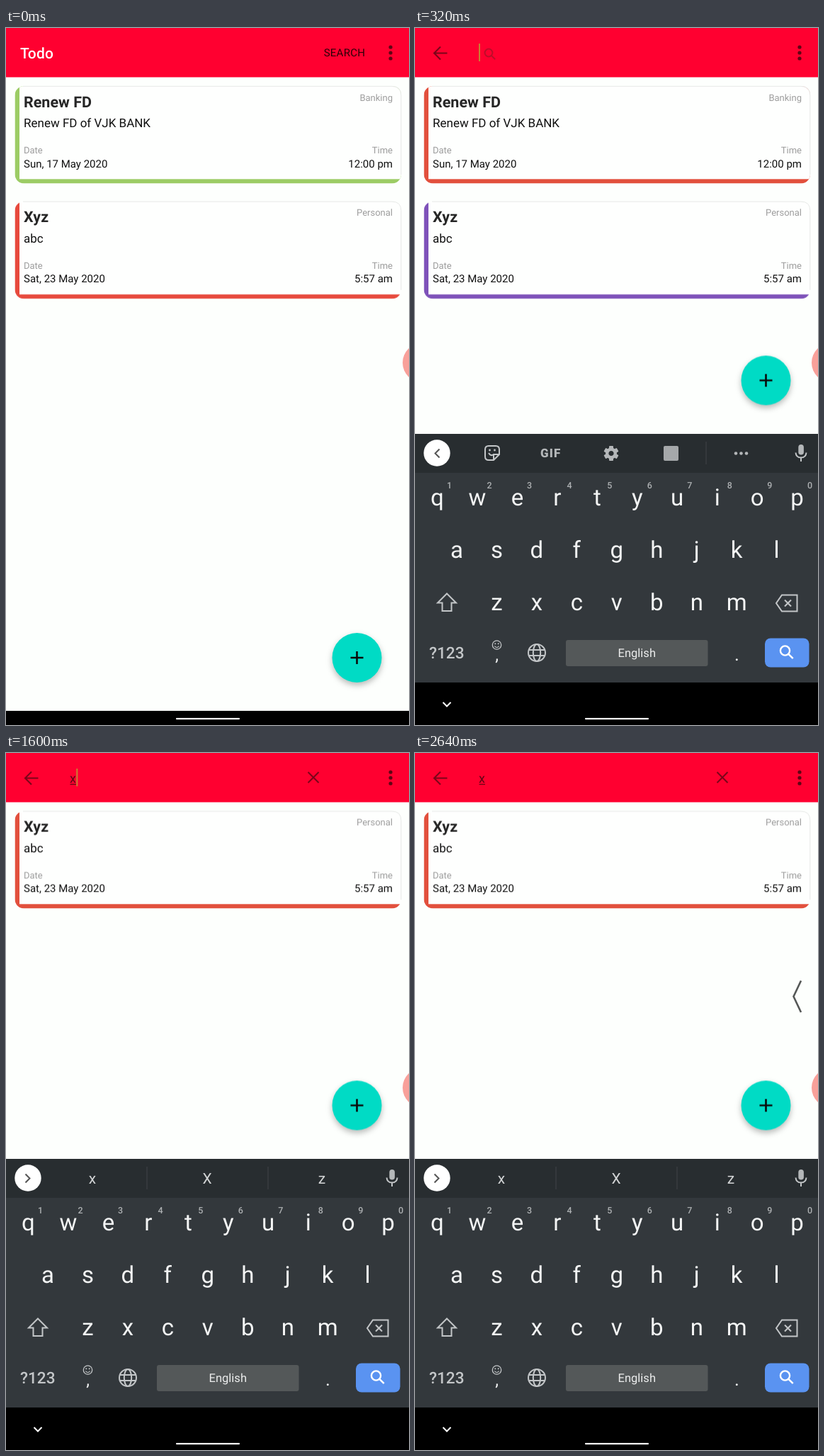
Write an HTML page that moves like this. It is 569 by 984 pixels and loops after 2680 ms.

```html
<!DOCTYPE html>
<html lang="en">
<head>
<meta charset="utf-8">
<title>Todo search</title>
<style>
  html, body { margin: 0; width: 100%; height: 100%; overflow: hidden; background: #fdfffd; }
  svg { display: block; width: 569px; height: 984px; }
  text { font-family: Roboto, sans-serif; text-rendering: geometricPrecision; white-space: pre; }
  .line { fill: none; stroke: #c3c6c8; stroke-width: 2; }
  .bar { fill: none; stroke: #7a0519; stroke-width: 2.1; }
  .small { font-size: 13px; fill: #9d9d9d; }
  .value { font-size: 15px; fill: #111; }
  .key { font-size: 33px; fill: #f4f5f5; text-anchor: middle; }
  .hint { font-size: 12.5px; font-weight: 500; fill: #aeb1b3; text-anchor: middle; }
  .word { font-size: 21px; fill: #d3d5d6; text-anchor: middle; }
  .end { text-anchor: end; }
  #fab { filter: drop-shadow(0 4px 4px rgba(0, 0, 0, .27)); }
</style>
</head>
<body>
<svg id="stage" viewBox="0 0 569 984"></svg>
<script>
const LOOP = 2680;
const T = { search: 80, slide: 160, docked: 320, press: 1160, typed: 1320, filter: 1360, tap: 1760, back: 2520 };

const text = (x, y, s, cls = '', more = '') => `<text x="${x}" y="${y}" class="${cls}" ${more}>${s}</text>`;
const path = (d, cls = 'line', more = '') => `<path d="${d}" class="${cls}" ${more}/>`;
const rect = (x, y, w, h, fill, rx = 0, more = '') =>
  `<rect x="${x}" y="${y}" width="${w}" height="${h}" rx="${rx}" fill="${fill}" ${more}/>`;
const circle = (x, y, r, fill, more = '') => `<circle cx="${x}" cy="${y}" r="${r}" fill="${fill}" ${more}/>`;
const group = (id, body, more = '') => `<g id="${id}" ${more}>${body}</g>`;

function card(id, y, title, note, kind, date, time) {
  return group(id, `<g transform="translate(0 ${y})">
    <g clip-path="url(#cardClip)">
      ${rect(12.5, 82, 545.5, 137.5, '#000', 0, `id="${id}Edge"`)}
      ${rect(19, 82, 540, 131.3, '#fefffe')}
      ${id === 'xyz' ? group('ripple', circle(0, 0, 1, '#dcdddc'), 'clip-path="none"') && '<g clip-path="url(#rippleClip)"><circle id="ripple" r="1" fill="#dcdddc"/></g>' : ''}
    </g>
    ${path('M24 82.3H545Q557.8 82.3 557.8 95V207', '', 'fill="none" stroke="#e6e8e6"')}
    ${text(25, 111.5, title, '', 'font-size="21.5" font-weight="700" fill="#262626"')}
    ${text(25, 140, note, '', 'font-size="17" fill="#111"')}
    ${text(546, 102.5, kind, 'small end')}
    ${text(25, 177, 'Date', 'small')}${text(546, 177, 'Time', 'small end')}
    ${text(25, 196.7, date, 'value')}${text(546, 196.7, time, 'value end')}
  </g>`);
}

const lens = (x, y, r, more) =>
  circle(x, y, r, 'none', more) + path(`M${x + r * .7} ${y + r * .7}l${r} ${r}`, '', more);

function gear(x, y) {
  let teeth = '';
  for (let i = 0; i < 6; i++) teeth += rect(-3, -10.5, 6, 6, '#b4b7b9', 1, `transform="rotate(${i * 60})"`);
  return `<g transform="translate(${x} ${y})">${teeth}${circle(0, 0, 5.8, 'none', 'stroke="#b4b7b9" stroke-width="4.4"')}</g>`;
}

function letters(row, x, y) {
  return [...row].map((c, i) => text(x + 56.45 * i, y, c, 'key')).join('');
}

function keyboard() {
  const digits = [...'1234567890'].map((c, i) => text(48.5 + 56.55 * i, 649.5, c, 'hint')).join('');
  const split = x => path(`M${x} 584V616`, '', 'stroke="#3b4043" stroke-width="1.3"');
  const tools = path('M104 590H114Q119 590 119 595V602L111 610H104Q99 610 99 605V595Q99 590 104 590ZM111 610V602H119')
    + path('M104 600Q107 605 111 602', 'line') + circle(105.5, 596, 1.4, '#c3c6c8') + circle(112.5, 596, 1.4, '#c3c6c8')
    + text(177, 606.2, 'GIF', '', 'font-size="17" font-weight="900" letter-spacing="1.1" fill="#b4b7b9"')
    + gear(277, 600.5) + rect(351, 590, 21, 21, '#a5a8aa', 2) + split(411)
    + [453, 460.5, 468].map(x => circle(x, 600.5, 2.3, '#b4b7b9')).join('')
    + path('M34.5 594.5L28.5 600.5L34.5 606.5', '', 'fill="none" stroke="#555" stroke-width="2"');
  const words = text(122, 608, 'x', 'word') + text(284, 608, 'X', 'word') + text(446, 608, 'z', 'word')
    + split(199) + split(370)
    + path('M27.5 594.5L33.5 600.5L27.5 606.5', '', 'fill="none" stroke="#555" stroke-width="2"');
  const mic = rect(541.3, 588, 7.6, 14.5, '#b4b7b9', 3.8)
    + path('M537.5 599.5Q538 606.5 545 606.5T552.5 599.5M545 606.5V612');
  const globe = circle(172, 882, 12, 'none', 'class="line"')
    + '<ellipse cx="172" cy="882" rx="5.2" ry="12" class="line"/>' + path('M161 878H183M161 886H183');
  const smile = circle(115.5, 871, 6.2, 'none', 'stroke="#c3c6c8" stroke-width="1.3"')
    + circle(113.3, 869.3, 1, '#c3c6c8') + circle(117.7, 869.3, 1, '#c3c6c8')
    + path('M112.3 872.5Q115.5 876.5 118.7 872.5', '', 'fill="none" stroke="#c3c6c8" stroke-width="1.2"');
  return rect(0, 573, 569, 411, '#000') + rect(0, 573, 569, 351, '#33383c') + rect(0, 573, 569, 55, '#282d30')
    + circle(31, 600, 18.7, '#fff') + group('tools', tools) + group('words', words) + mic + digits
    + letters('qwertyuiop', 31.5, 674) + letters('asdfghjkl', 59, 748) + letters('zxcvbnm', 115.5, 821.5)
    + path('M45 798.5L58 811.5H51.5V823H38.5V811.5H32Z')
    + path('M518 800.5H539.5V823.5H518L510 812ZM522 807.5L531 816.5M531 807.5L522 816.5')
    + text(20, 890, '?123', '', 'font-size="22.6" font-weight="500" fill="#c3c6c8"')
    + smile + text(115.5, 893, ',', 'key', 'style="font-size:24px"') + globe
    + rect(213, 864, 200.5, 37, '#545859', 3)
    + text(313.3, 888.3, 'English', '', 'font-size="16.5" fill="#eceded" text-anchor="middle"')
    + text(454.5, 893, '.', 'key', 'style="font-size:26px"')
    + rect(494, 861.5, 62.5, 41, '#5a93f1', 8)
    + lens(522.5, 879, 6.6, 'fill="none" stroke="#fff" stroke-width="2.4"')
    + group('popup', rect(146.5, 694, 51.5, 149, '#272c2f', 6) + text(172, 742, 'x', 'key', 'style="font-size:34px"'));
}

const dots = [27, 35, 43].map(y => circle(543, y, 2.6, '#5e0614')).join('');
const home = text(20, 43, 'Todo', '', 'font-size="21" font-weight="500" fill="#fff" letter-spacing=".2"')
  + text(448.7, 40.2, 'SEARCH', '', 'font-size="15" fill="#2a0208" letter-spacing=".25"');
const query = path('M45.5 35.5H27.5M36 26.5L27 35.5L36 44.5', 'bar')
  + group('hint', lens(104, 35, 5.4, 'fill="none" stroke="#bd0d2a" stroke-width="2"'))
  + group('entry', text(90, 41.5, 'x', '', 'font-size="18" fill="#5e0614"')
    + path('M90.5 44.2H99', '', 'stroke="#5e0614" stroke-width="1.2"')
    + path('M426.5 27L441.5 42M441.5 27L426.5 42', 'bar'))
  + rect(90, 22, 2, 25, '#c97f32', 0, 'id="caret"');

document.getElementById('stage').innerHTML = `
  <defs>
    <clipPath id="cardClip"><rect x="12.5" y="82" width="545.5" height="137.5" rx="13"/></clipPath>
    <clipPath id="rippleClip"><rect x="19" y="82" width="540" height="125.3"/></clipPath>
  </defs>
  ${rect(0, 0, 569, 984, '#fdfffd')}
  ${card('renew', 0, 'Renew FD', 'Renew FD of VJK BANK', 'Banking', 'Sun, 17 May 2020', '12:00 pm')}
  ${card('xyz', 162.8, 'Xyz', 'abc', 'Personal', 'Sat, 23 May 2020', '5:57 am')}
  ${rect(0, 0, 569, 69.5, '#ff0030')}
  ${group('home', home)}${group('query', query)}${dots}
  ${group('fab', circle(495.5, 889, 35, '#00dbc5') + path('M486.5 889H504.5M495.5 880V898', '', 'stroke="#0a0a0a" stroke-width="2.6"'))}
  ${rect(0, 964, 569, 20, '#000')}
  ${group('keyboard', keyboard())}
  ${group('down', path('M39.5 952L45 957.5L50.5 952', '', 'fill="none" stroke="#fff" stroke-width="2"'))}
  ${rect(240, 974, 90, 2.2, '#fff', 1)}
  ${circle(588, 472.5, 28, '#f8a09a')}
  ${group('swipe', path('M545 321.5L534.5 343.8L545 366', '', 'fill="none" stroke="#555857" stroke-width="2.6"'))}`;

// Each step is [ms, value]; hard steps hold until the next one.
function play(id, prop, steps, easing = 'steps(1, end)') {
  const all = [...steps, [LOOP, steps[steps.length - 1][1]]];
  document.getElementById(id).animate(
    all.map(([ms, v]) => ({ offset: ms / LOOP, [prop]: v, easing })),
    { duration: LOOP, iterations: Infinity });
}
const show = (id, from, to = LOOP) =>
  play(id, 'opacity', [...(from ? [[0, 0]] : []), [from, 1], ...(to < LOOP ? [[to, 0]] : [])]);
const move = (x, y) => `translate(${x}px, ${y}px)`;
const spot = (x, r) => `translate(${x}px, 150px) scale(${r})`;

show('home', 0, T.search);
show('query', T.search);
show('hint', T.search, T.typed);
show('entry', T.typed);
show('tools', 0, T.typed);
show('words', T.typed);
show('popup', T.press, T.typed);
show('down', T.slide);
show('renew', 0, T.filter);

play('renewEdge', 'fill', [[0, '#9ccc65'], [T.search, '#e2503d']]);
play('xyzEdge', 'fill', [[0, '#e74a3d'], [T.search, '#7e52b9'], [T.filter, '#e2503d']]);
play('xyz', 'transform', [[0, move(0, 0)], [T.filter, move(0, -162.8)]]);
play('fab', 'transform', [[0, move(0, 0)], [T.docked, move(0, -391.5)]]);

play('caret', 'opacity', [[0, 1], [640, 0], [T.press, 1], [2040, 0]]);
play('caret', 'transform', [[0, move(0, 0)], [T.typed, move(9.3, 0)]]);

play('keyboard', 'transform', [[0, move(0, 260)], [T.slide, move(0, 260)], [240, move(0, 98)], [280, move(0, 34)], [T.docked, move(0, 0)]], 'linear');
play('keyboard', 'opacity', [[0, 0], [T.slide, 0], [240, .54], [T.docked, 1]], 'linear');

play('ripple', 'transform', [[0, spot(130, 0)], [T.tap, spot(130, 60)], [1920, spot(206, 285)], [2000, spot(288, 300)]], 'linear');
play('ripple', 'opacity', [[0, 0], [T.tap, 0], [1800, 1], [2000, 1], [2160, 0]], 'linear');

play('swipe', 'transform', [[0, move(30, 0)], [T.back, move(30, 0)], [2640, move(0, 0)]], 'linear');
play('swipe', 'opacity', [[0, 0], [T.back, 0], [2600, 1]], 'linear');
</script>
</body>
</html>
```
